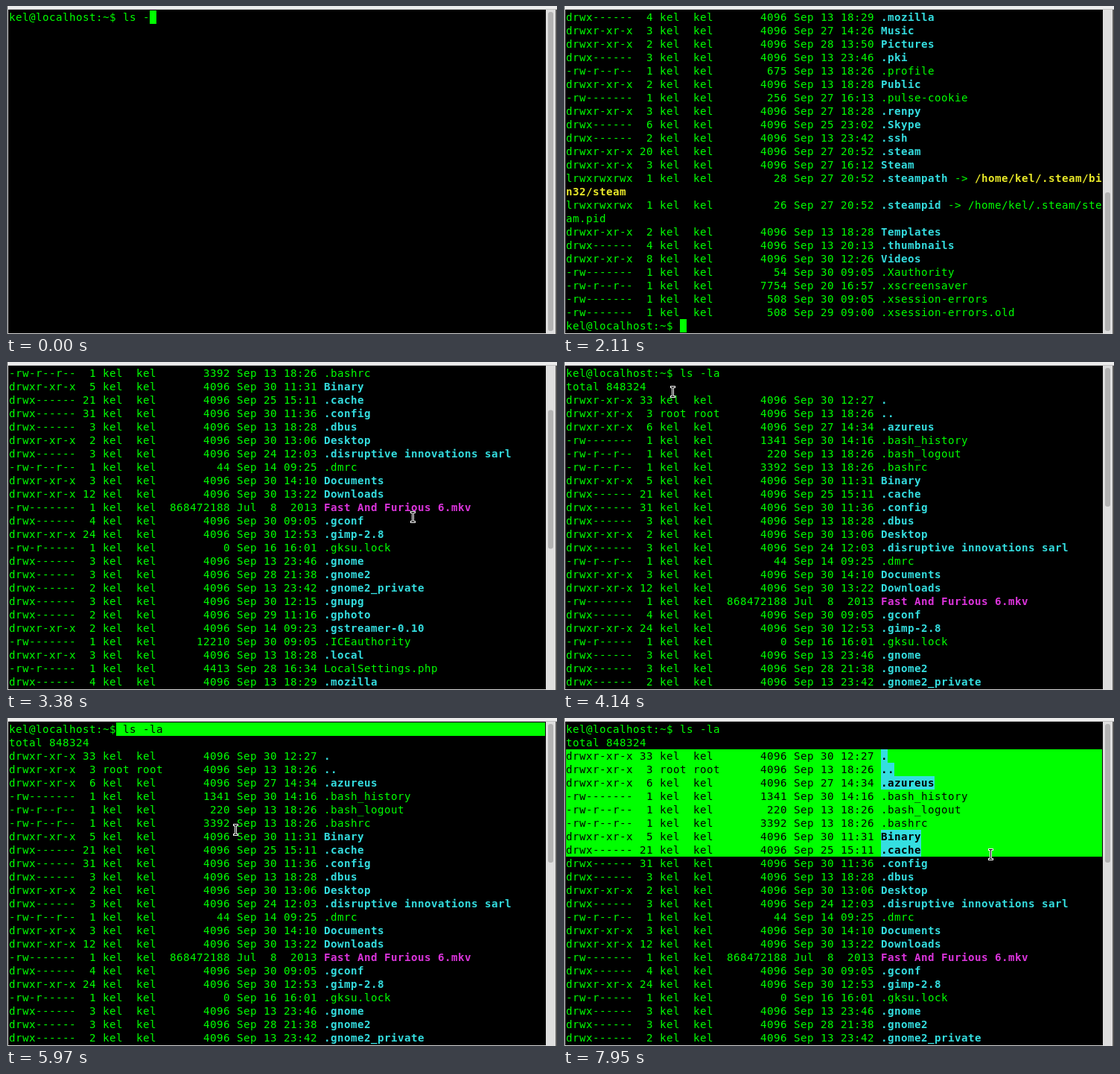
Recreate the animation shown at these times as an HTML page with a canvas. Size 740 px wide and 440 px high, loop 7990 ms.

```html
<!DOCTYPE html>
<html lang="en">
<head>
<meta charset="utf-8">
<title>Terminal</title>
<style>
  html, body { margin: 0; width: 100%; height: 100%; overflow: hidden; background: #000; }
  canvas { display: block; }
</style>
</head>
<body>
<canvas id="stage" width="740" height="440"></canvas>
<script>
const ctx = document.getElementById('stage').getContext('2d');
const LOOP = 7990, ROWS = 24, COLS = 80, CELL_W = 9, CELL_H = 18, LEFT = 4, TOP = 6;
const GREEN = '#00ff00', CYAN = '#34dee0', MAGENTA = '#dc34dc', YELLOW = '#e8e828';
const FONT = '14.2px "DejaVu Sans Mono", monospace';
const USER = 'kel';
const PROMPT = USER + '@localhost:~$ ';

// permissions, links, size, date, name
const LISTING = `drwxr-xr-x 33 4096 Sep 30 12:27 .
drwxr-xr-x 3 4096 Sep 13 18:26 ..
drwxr-xr-x 6 4096 Sep 27 14:34 .azureus
-rw------- 1 1341 Sep 30 14:16 .bash_history
-rw-r--r-- 1 220 Sep 13 18:26 .bash_logout
-rw-r--r-- 1 3392 Sep 13 18:26 .bashrc
drwxr-xr-x 5 4096 Sep 30 11:31 Binary
drwx------ 21 4096 Sep 25 15:11 .cache
drwx------ 31 4096 Sep 30 11:36 .config
drwx------ 3 4096 Sep 13 18:28 .dbus
drwxr-xr-x 2 4096 Sep 30 13:06 Desktop
drwx------ 3 4096 Sep 24 12:03 .disruptive innovations sarl
-rw-r--r-- 1 44 Sep 14 09:25 .dmrc
drwxr-xr-x 3 4096 Sep 30 14:10 Documents
drwxr-xr-x 12 4096 Sep 30 13:22 Downloads
-rw------- 1 868472188 Jul  8  2013 Fast And Furious 6.mkv
drwx------ 4 4096 Sep 30 09:05 .gconf
drwxr-xr-x 24 4096 Sep 30 12:53 .gimp-2.8
-rw-r----- 1 0 Sep 16 16:01 .gksu.lock
drwx------ 3 4096 Sep 13 23:46 .gnome
drwx------ 3 4096 Sep 28 21:38 .gnome2
drwx------ 2 4096 Sep 13 23:42 .gnome2_private
drwx------ 3 4096 Sep 30 12:15 .gnupg
drwx------ 2 4096 Sep 29 11:16 .gphoto
drwxr-xr-x 2 4096 Sep 14 09:23 .gstreamer-0.10
-rw------- 1 12210 Sep 30 09:05 .ICEauthority
drwxr-xr-x 3 4096 Sep 13 18:28 .local
-rw-r----- 1 4413 Sep 28 16:34 LocalSettings.php
drwx------ 4 4096 Sep 13 18:29 .mozilla
drwxr-xr-x 3 4096 Sep 27 14:26 Music
drwxr-xr-x 2 4096 Sep 28 13:50 Pictures
drwx------ 3 4096 Sep 13 23:46 .pki
-rw-r--r-- 1 675 Sep 13 18:26 .profile
drwxr-xr-x 2 4096 Sep 13 18:28 Public
-rw------- 1 256 Sep 27 16:13 .pulse-cookie
drwxr-xr-x 3 4096 Sep 27 18:28 .renpy
drwx------ 6 4096 Sep 25 23:02 .Skype
drwx------ 2 4096 Sep 13 23:42 .ssh
drwxr-xr-x 20 4096 Sep 27 20:52 .steam
drwxr-xr-x 3 4096 Sep 27 16:12 Steam
lrwxrwxrwx 1 28 Sep 27 20:52 .steampath -> /home/${USER}/.steam/bin32/steam
lrwxrwxrwx 1 26 Sep 27 20:52 .steampid -> /home/${USER}/.steam/steam.pid
drwxr-xr-x 2 4096 Sep 13 18:28 Templates
drwx------ 4 4096 Sep 13 20:13 .thumbnails
drwxr-xr-x 8 4096 Sep 30 12:26 Videos
-rw------- 1 54 Sep 30 09:05 .Xauthority
-rw-r--r-- 1 7754 Sep 20 16:57 .xscreensaver
-rw------- 1 508 Sep 30 09:05 .xsession-errors
-rw------- 1 508 Sep 29 09:00 .xsession-errors.old`;

const cells = (text, color = GREEN) => [...text].map(char => ({ char, color }));

function formatEntry(entry) {
  const [, mode, links, size, date, name] = entry.match(/^(\S+) (\d+) (\d+) (.{12}) (.*)$/);
  const owner = (name === '..' ? 'root' : USER).padEnd(4);
  const info = `${mode} ${links.padStart(2)} ${owner} ${owner} ${size.padStart(9)} ${date} `;
  const [label, target] = name.split(' -> ');
  const color = /^[dl]/.test(mode) ? CYAN : label.endsWith('.mkv') ? MAGENTA : GREEN;
  const row = [...cells(info), ...cells(label, color)];
  if (target) row.push(...cells(' -> '), ...cells(target, target.endsWith('.pid') ? GREEN : YELLOW));
  return row.length > COLS ? [row.slice(0, COLS), row.slice(COLS)] : [row];
}

const output = [
  cells(PROMPT + 'ls -la'),
  cells('total 848324'),
  ...LISTING.split('\n').flatMap(formatEntry),
  cells(PROMPT)
];
const MAX_SCROLL = output.length - ROWS;

// Number of steps already taken, the first one at start and the last one at end
const stepsTaken = (t, start, end, count) =>
  t < start ? 0 : Math.min(count, Math.floor((t - start) * (count - 1) / (end - start)) + 1);

// Pointer moves: start, end, steps, target x, target y (top left corner), linear
const MOVES = [
  [2660, 2860, 6, 543, 200],
  [3940, 4140, 6, 144, 32],
  [4320, 4600, 8, 149, 4],
  [5170, 5400, 6, 250, 4],
  [5720, 5970, 5, 305, 142],
  [6340, 7100, 20, 7, 46],
  [7180, 7181, 1, 6, 46],
  [7570, 7950, 9, 571, 175, true]
];

function pointerAt(t) {
  let x = 700, y = 320;
  for (const [start, end, count, toX, toY, linear] of MOVES) {
    const p = stepsTaken(t, start, end, count) / count;
    const eased = linear ? p : p * p * (3 - 2 * p);
    x += (toX - x) * eased;
    y += (toY - y) * eased;
  }
  return { x: Math.round(x), y: Math.round(y) };
}

function selectionAt(t, pointer) {
  const col = Math.floor((pointer.x + 3 - LEFT) / CELL_W);
  const row = Math.floor((pointer.y + 8 - TOP) / CELL_H);
  if (t >= 5170 && t < 6200) return { row: 0, col: 16, endRow: 0, endCol: t < 5400 ? col : COLS };
  if (t >= 7570) return { row: 2, col: 0, endRow: row, endCol: col };
  return null;
}

function rect(color, x, y, w, h) {
  ctx.fillStyle = color;
  ctx.fillRect(x, y, w, h);
}

function drawRow(line, row, sel) {
  const y = TOP + row * CELL_H;
  let from = COLS, to = COLS;
  if (sel && row >= sel.row && row <= sel.endRow) {
    from = row === sel.row ? sel.col : 0;
    if (row === sel.endRow && sel.endCol < line.length) to = sel.endCol + 1;
    rect(GREEN, LEFT + from * CELL_W, y, (to - from) * CELL_W, CELL_H);
  }
  line.forEach(({ char, color }, i) => {
    const x = LEFT + i * CELL_W;
    const selected = i >= from && i < to;
    if (selected && color !== GREEN) rect(color, x, y, CELL_W, CELL_H);
    if (char === ' ') return;
    ctx.font = (color === GREEN ? '' : 'bold ') + FONT;
    ctx.fillStyle = selected ? '#000' : color;
    ctx.fillText(char, x, y + 14);
  });
}

function drawWindow(thumbY, thumbH) {
  rect('#000', 0, 0, 740, 440);
  rect('#ececec', 0, 0, 740, 4);
  rect('#c0c0c0', 0, 4, 740, 1);
  rect('#4a4e54', 0, 0, 2, 440);
  rect('#d8d8d8', 2, 0, 1, 440);
  rect('#d8d8d8', 2, 439, 737, 1);
  rect('#dedede', 725, 5, 13, 435);
  rect('#5c5c5c', 738, 5, 2, 435);
  ctx.fillStyle = '#b2b2b2';
  ctx.beginPath();
  ctx.roundRect(728, thumbY, 7, thumbH, 3);
  ctx.fill();
}

// Black I-beam with a white outline
function drawPointer({ x, y }) {
  rect('#fff', x, y, 7, 3);
  rect('#fff', x, y + 13, 7, 3);
  rect('#fff', x + 2, y, 3, 16);
  rect('#000', x + 1, y + 1, 5, 1);
  rect('#000', x + 1, y + 14, 5, 1);
  rect('#000', x + 3, y + 1, 1, 14);
}

function draw(t) {
  const listed = t >= 2110;
  const typed = t < 100 ? 'ls -' : t < 1390 ? 'ls -l' : 'ls -la';
  const lines = listed ? output : [cells(PROMPT + typed)];
  if (t >= 2050 && !listed) lines.push([]);

  const scroll = listed ? Math.max(0, Math.round(MAX_SCROLL - 4.6 * stepsTaken(t, 3140, 3500, 7))) : 0;
  drawWindow(8 + scroll * 242 / MAX_SCROLL, listed ? 186 : 428);

  const pointer = pointerAt(t);
  const selection = selectionAt(t, pointer);
  lines.slice(scroll, scroll + ROWS).forEach((line, row) => drawRow(line, row, selection));

  const cursorOn = t < 700 || (t >= 1280 && t < 1980) || (t >= 2050 && t < 2660);
  if (cursorOn) {
    const last = lines.length - 1;
    rect(GREEN, LEFT + lines[last].length * CELL_W, TOP + (last - scroll) * CELL_H, CELL_W, CELL_H);
  }
  if (t >= 2660) drawPointer(pointer);
}

function tick() {
  draw(performance.now() % LOOP);
  requestAnimationFrame(tick);
}
tick();
</script>
</body>
</html>
```
